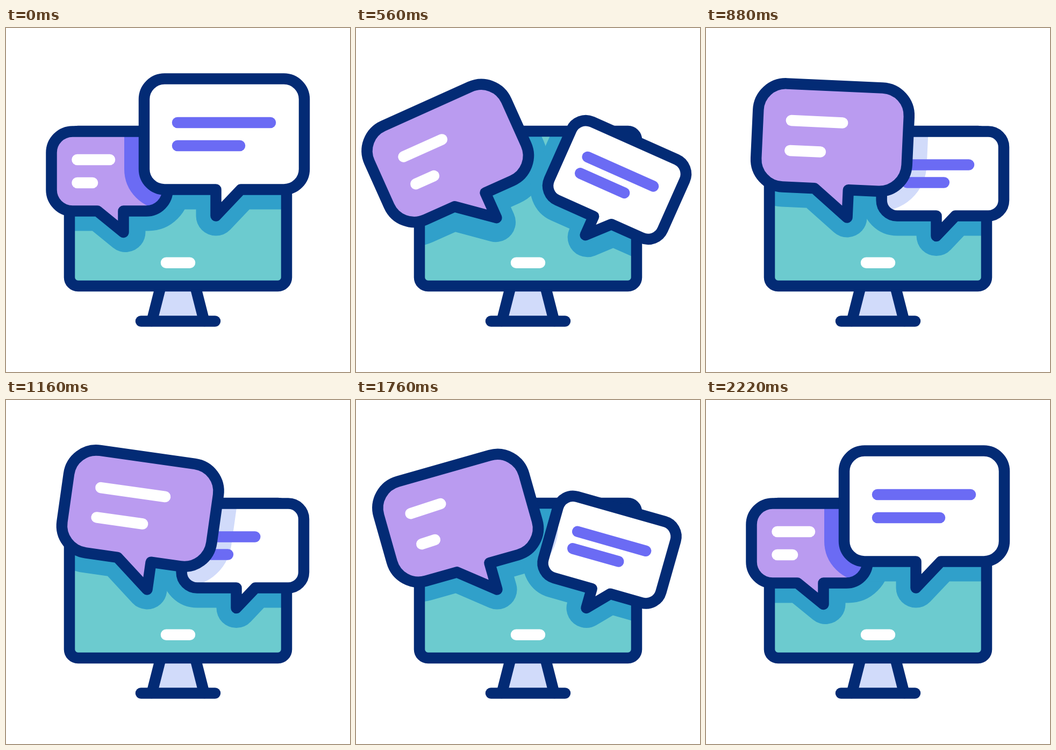
An HTML page with a canvas for the animation above (2.4 s loop, 640 px wide and 640 px high).

```html
<!DOCTYPE html>
<html lang="en">
<head>
<meta charset="utf-8">
<title>Chat bubbles</title>
<style>
  html, body { margin: 0; width: 100%; height: 100%; overflow: hidden; background: #fff; }
  canvas { display: block; width: 640px; height: 640px; }
</style>
</head>
<body>
<canvas></canvas>
<script>
const LOOP = 2400;
const OUT = 200, BACK = 1780, HOME = 2220;
const LINE = 20.5, SHADE = 74, ROW = 43;
const NAVY = '#032b75', TEAL = '#6ccbcf', DEEP = '#30a0ca', PALE = '#d1dbfa';
const LILAC = '#ba9bf0', VIOLET = '#6b6bf4', WHITE = '#fff';

const canvas = document.querySelector('canvas');
const ctx = canvas.getContext('2d');
const dpr = window.devicePixelRatio || 1;
canvas.width = canvas.height = 640 * dpr;

// Smooth step from 0 to 1 between times a and b
function ease(t, a, b) {
  const u = Math.min(1, Math.max(0, (t - a) / (b - a)));
  return (1 - Math.cos(Math.PI * u)) / 2;
}

// Rises from a to b, falls from c to d
const pulse = (t, a, b, c, d) => ease(t, a, b) - ease(t, c, d);

const leaving = t => pulse(t, OUT, 560, 560, 800);
const returning = t => pulse(t, BACK, 1940, 1940, HOME);
const slip = t => pulse(t, 1400, 1940, 1940, HOME);

// Both bubbles lean outward on each crossing; settle is when the first lean ends
const lean = (t, peak, settle) =>
  26 * (pulse(t, OUT, peak, peak, settle) + pulse(t, 1550, 1920, 1920, HOME));

// Speech bubble outline, measured from the tip of its tail
function outline({ left, right, top, bottom, radius, tail }) {
  const p = new Path2D();
  p.moveTo(tail[0], bottom);
  p.lineTo(0, 0);
  p.lineTo(tail[1], bottom);
  p.arcTo(right, bottom, right, top, radius);
  p.arcTo(right, top, left, top, radius);
  p.arcTo(left, top, left, bottom, radius);
  p.arcTo(left, bottom, right, bottom, radius);
  p.closePath();
  return p;
}

const lilac = {
  path: outline({ left: -134, right: 82, top: -187.5, bottom: -39.5, radius: 39.5, tail: [-48.5, 0] }),
  home: [218.5, 380], away: [262.5, 352.5], size: 1.3, land: 600,
  angle: t => 8.5 * pulse(t, 480, 1030, 1110, 1460) - lean(t, 480, 1030),
  sway: [0, -1.5], rest: 4, lagOut: [-1.5, 8], lagBack: [6, -2],
  fill: LILAC, shaded: VIOLET, ink: WHITE, tilt: -0.05,
  barX: -86, barY: -135,
  bars: [
    { len: 60.5, type: 32.5, dip: -20.5, shift: -4.5, end: 1750 },
    { len: 28.5, type: 38, dip: -11.5, shift: 0, end: 1500 }
  ]
};

const white = {
  path: outline({ left: -133.5, right: 164.5, top: -255, bottom: -49, radius: 38, tail: [0, 46.5] }),
  home: [390.5, 349.5], away: [428.5, 387], size: 0.763, land: 620,
  angle: t => lean(t, 500, 840),
  sway: [2.7, -4.4], rest: 0, lagOut: [4, 4], lagBack: [0, 3],
  fill: WHITE, shaded: PALE, ink: VIOLET, tilt: 0,
  barX: -71.5, barY: -173.5,
  bars: [
    { len: 173, type: -56, dip: 0, shift: 0, end: 1750 },
    { len: 116, type: -65, dip: 0, shift: 0, end: 1750 }
  ]
};

function pose(b, t) {
  const p = pulse(t, OUT, b.land, BACK, HOME);
  const [x, y] = b.home.map((h, i) => h + (b.away[i] - h) * p + b.sway[i] * returning(t));
  return { x, y, p, s: 1 + (b.size - 1) * p, a: b.angle(t) * Math.PI / 180 };
}

const reset = () => ctx.setTransform(dpr, 0, 0, dpr, 0, 0);

function place(q, dx = 0, dy = 0) {
  reset();
  ctx.translate(q.x + dx, q.y + dy);
  ctx.rotate(q.a);
  ctx.scale(q.s, q.s);
}

function shadow(b, t, color) {
  const q = pose(b, t);
  const [dx, dy] = b.lagOut.map((v, i) => v * leaving(t) + b.lagBack[i] * returning(t));
  place(q, dx + b.rest * (1 - q.p), dy);
  ctx.fillStyle = ctx.strokeStyle = color;
  ctx.lineWidth = SHADE / q.s;
  ctx.fill(b.path);
  ctx.stroke(b.path);
}

function stroke(points, color, width = LINE) {
  ctx.strokeStyle = color;
  ctx.lineWidth = width;
  ctx.beginPath();
  points.forEach(([x, y]) => ctx.lineTo(x, y));
  ctx.stroke();
}

function bubble(b, t, over) {
  const q = pose(b, t);
  const width = LINE / q.s;
  place(q);
  ctx.fillStyle = b.fill;
  ctx.fill(b.path);
  if (over) {
    ctx.save();
    ctx.clip(b.path);
    shadow(over, t, b.shaded);
    ctx.restore();
  }
  place(q);
  const k = slip(t), tilt = b.tilt * k;
  b.bars.forEach((bar, i) => {
    const x = b.barX + bar.shift * k;
    const y = b.barY + ROW * i + bar.shift * k;
    const n = bar.len + bar.type * pulse(t, 660, 1170, 1170, bar.end) + bar.dip * k;
    stroke([[x, y], [x + n * Math.cos(tilt), y + n * Math.sin(tilt)]], b.ink, width);
  });
  ctx.strokeStyle = NAVY;
  ctx.lineWidth = width;
  ctx.stroke(b.path);
}

function box(x, y, w, h, r) {
  const p = new Path2D();
  p.roundRect(x, y, w, h, r);
  return p;
}
const frame = box(118, 192, 404, 288, 16);
const screen = box(128, 202, 384, 268, 6);

function stand() {
  const legs = [[288, 480], [271.4, 545], [368.6, 545], [352, 480]];
  ctx.fillStyle = PALE;
  ctx.beginPath();
  legs.forEach(([x, y]) => ctx.lineTo(x, y));
  ctx.fill();
  stroke(legs.slice(0, 2), NAVY);
  stroke(legs.slice(2), NAVY);
  stroke([[251, 545.5], [389, 545.5]], NAVY);
}

function monitor(t) {
  ctx.fillStyle = TEAL;
  ctx.fill(frame);
  ctx.save();
  ctx.clip(screen);
  shadow(lilac, t, DEEP);
  shadow(white, t, DEEP);
  ctx.restore();
  reset();
  ctx.strokeStyle = NAVY;
  ctx.lineWidth = LINE;
  ctx.stroke(frame);
  stroke([[298, 436.7], [342, 436.7]], WHITE);
}

function draw(t) {
  reset();
  ctx.lineCap = ctx.lineJoin = 'round';
  ctx.fillStyle = WHITE;
  ctx.fillRect(0, 0, 640, 640);
  stand();
  monitor(t);
  const lilacFront = t > 490 && t < 1930;
  const [back, front] = lilacFront ? [white, lilac] : [lilac, white];
  bubble(back, t, front);
  bubble(front, t);
}

const start = performance.now();
function tick() {
  draw((performance.now() - start) % LOOP);
  requestAnimationFrame(tick);
}
tick();
</script>
</body>
</html>
```
